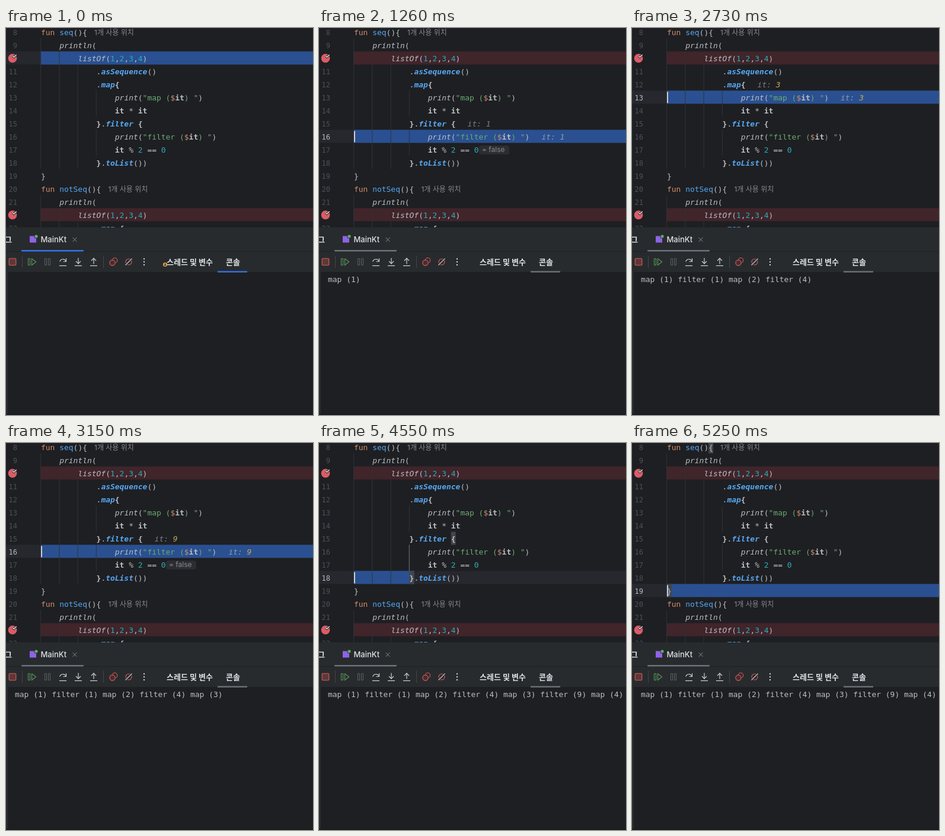
Animation of 518 by 652 pixels, one loop 5.39 s. Source, as an HTML page with a canvas:

```html
<!DOCTYPE html>
<html lang="ko">
<head>
<meta charset="utf-8">
<title>Sequence debugging</title>
<style>
html, body { margin: 0; width: 100%; height: 100%; overflow: hidden; background: #1e1f22; }
canvas { display: block; width: 518px; height: 652px; }
</style>
</head>
<body>
<canvas id="stage"></canvas>
<script>
const W = 518, H = 652, LOOP = 5390;
const LEFT = 59, CHAR = 7.8, ROW = 22;
const MONO = '12.95px "DejaVu Sans Mono", "Noto Sans Mono", monospace';
const SANS = 'Inter, "Noto Sans CJK KR", "Noto Sans CJK", sans-serif';

const canvas = document.getElementById('stage');
const ctx = canvas.getContext('2d');
const ratio = window.devicePixelRatio || 1;
canvas.width = W * ratio;
canvas.height = H * ratio;

// token styles: [colour, font prefix]
const STYLE = {
  k: ['#cf8e6d', ''],
  d: ['#56a8f5', ''],
  p: ['#bcbec4', ''],
  b: ['#bcbec4', 'bold'],
  i: ['#bcbec4', 'italic'],
  f: ['#56a8f5', 'italic bold'],
  n: ['#2aacb8', ''],
  s: ['#6aab73', '']
};

const listOf = [['i', 'listOf'], ['p', '('], ['n', '1'], ['p', ','], ['n', '2'], ['p', ','],
  ['n', '3'], ['p', ','], ['n', '4'], ['p', ')']];
const printCall = name => [['i', 'print'], ['p', '('], ['s', '"' + name + ' ('], ['k', '$'],
  ['b', 'it'], ['s', ') "'], ['p', ')']];
const funHead = name => [['k', 'fun '], ['d', name], ['p', '(){']];
const println = [['i', 'println'], ['p', '(']];

// code from line 8 on: [indent, tokens]
const CODE = [
  [0, funHead('seq')],
  [4, println],
  [8, listOf],
  [12, [['p', '.'], ['f', 'asSequence'], ['p', '()']]],
  [12, [['p', '.'], ['f', 'map'], ['b', '{']]],
  [16, printCall('map')],
  [16, [['b', 'it'], ['p', ' * '], ['b', 'it']]],
  [12, [['b', '}'], ['p', '.'], ['f', 'filter'], ['b', ' {']]],
  [16, printCall('filter')],
  [16, [['b', 'it'], ['p', ' % '], ['n', '2'], ['p', ' == '], ['n', '0']]],
  [12, [['b', '}'], ['p', '.'], ['f', 'toList'], ['p', '())']]],
  [0, [['p', '}']]],
  [0, funHead('notSeq')],
  [4, println],
  [8, listOf],
  [12, [['p', '.'], ['f', 'map'], ['b', ' {']]]
];

// debugger stops: [time, line, delay of the value beside the line]
const STOPS = [
  [0, 10], [560, 13], [910, 14], [1120, 16, 70], [1470, 17],
  [1680, 13], [1960, 14], [2170, 16, 70], [2450, 17],
  [2660, 13], [2940, 14], [3150, 16], [3360, 17],
  [3640, 13], [3850, 14], [4060, 16], [4270, 17],
  [4550, 18], [4760, 9], [5180, 19]
];
const FOCUS_TIME = 70;
const OUTPUT = [1, 2, 3, 4].flatMap(v => [`map (${v}) `, `filter (${v * v}) `]);

const midY = line => 7 + ROW * (line - 8);
const topY = line => midY(line) - 11.5;
const colX = col => LEFT + col * CHAR;
const endX = line => {
  const [indent, tokens] = CODE[line - 8];
  return colX(indent + tokens.reduce((n, t) => n + t[1].length, 0));
};

function rect(x, y, w, h, color) {
  ctx.fillStyle = color;
  ctx.fillRect(x, y, w, h);
}

function text(str, x, y, color, font, align = 'left') {
  ctx.font = font;
  ctx.fillStyle = color;
  ctx.textAlign = align;
  ctx.fillText(str, x, y);
}

function stroke(color, width, build) {
  ctx.strokeStyle = color;
  ctx.lineWidth = width;
  ctx.beginPath();
  build(ctx);
  ctx.stroke();
}

function path(color, width, ...pts) {
  stroke(color, width, c => {
    for (let i = 0; i < pts.length; i += 2) c.lineTo(pts[i], pts[i + 1]);
  });
}

function disc(x, y, r, color) {
  ctx.fillStyle = color;
  ctx.beginPath();
  ctx.arc(x, y, r, 0, 7);
  ctx.fill();
}

function ring(x, y, r, color, fill) {
  if (fill) disc(x, y, r, fill);
  stroke(color, 1.1, c => c.arc(x, y, r, 0, 7));
}

function box(x, y, w, h, r, fill, line) {
  ctx.beginPath();
  ctx.roundRect(x, y, w, h, r);
  if (fill) { ctx.fillStyle = fill; ctx.fill(); }
  if (line) { ctx.strokeStyle = line; ctx.lineWidth = 1.1; ctx.stroke(); }
}

function guide(col, from, to, color = '#313438') {
  rect(colX(col) - 0.8, topY(from), 1, topY(to + 1) - topY(from), color);
}

function bracket(line, col) {
  rect(colX(col), topY(line), CHAR, ROW, '#43454a');
}

function breakpoint(line) {
  const y = midY(line);
  disc(11, y, 7.4, '#db5c66');
  path('#1e1f22', 3.2, 11, y - 4, 13.3, y - 1.8, 18, y - 6.3);
  path('#e8e8ea', 1.5, 11, y - 4, 13.3, y - 1.8, 17.6, y - 6);
}

function valueHint(line, value, changed, x, onRow) {
  const y = midY(line) + 5, font = 'italic ' + MONO;
  const dim = onRow ? '#8c9bb8' : '#7a7e85';
  text('it: ', x, y, dim, font);
  text(value, x + 4 * CHAR, y, changed ? '#c4ab58' : dim, font);
}

function codeLine(line) {
  const [indent, tokens] = CODE[line - 8];
  let col = indent;
  for (const [kind, str] of tokens) {
    const [color, face] = STYLE[kind];
    text(str, colX(col), midY(line) + 5, color, `${face} ${MONO}`);
    col += str.length;
  }
}

function stateAt(t) {
  let k = 0;
  while (k + 1 < STOPS.length && t >= STOPS[k + 1][0]) k++;
  const [start, line, delay = 0] = STOPS[k];
  const item = Math.ceil(k / 4);
  const inMap = line === 13 || line === 14;
  const inFilter = line === 16 || line === 17;
  let printed = k ? 8 : 0;
  if (inMap) printed = 2 * item - 2;
  if (inFilter) printed = 2 * item - 1;
  return { line, item, inMap, inFilter, printed, focus: t >= FOCUS_TIME, beside: t >= start + delay };
}

function drawEditor(s) {
  rect(0, 0, W, 336, '#1e1f22');
  for (const line of [10, 22]) rect(58.5, topY(line), W, ROW, '#40252b');
  rect(0, topY(s.line), W, ROW, '#26282e');
  rect(58.5, topY(s.line), s.line === 18 ? colX(13) - 58.5 : W, ROW, '#2a5091');

  guide(0, 9, 18);
  guide(4, 10, 18);
  guide(8, 11, 18);
  guide(12, 13, 14);
  guide(12, 16, 17);
  guide(0, 21, 23);
  guide(4, 22, 23);
  guide(8, 23, 23);

  if (s.line === 18) {
    bracket(15, 21);
    bracket(18, 12);
    guide(12, 16, 17, '#6f737a');
  }
  if (s.line === 19) {
    bracket(8, 9);
    bracket(19, 0);
  }

  for (let line = 8; line <= 23; line++) {
    codeLine(line);
    if (line === 10 || line === 22) breakpoint(line);
    else text(line, 19, midY(line) + 5, line === s.line ? '#b4b8bf' : '#4b5059',
      '12px "DejaVu Sans Mono", monospace', 'right');
  }
  for (const line of [8, 20])
    text('1개 사용 위치', endX(line) + 12, midY(line) + 4.5, '#868a91', '400 12px ' + SANS);

  let gap = 20;
  const value = s.inFilter ? s.item * s.item : s.item;
  if (s.inFilter) {
    const even = value % 2 === 0;
    const w = even ? 46 : 51;
    box(270, 198, w, 15, 4, '#2b2d30');
    text(even ? '= true' : '= false', 275, 209, '#868a91', '400 12px ' + SANS);
    if (s.line === 17) gap += w;
  }
  if (s.inMap || s.inFilter) {
    const head = s.inMap ? 12 : 15, changed = s.item > 1;
    valueHint(head, value, changed, endX(head) + 20, false);
    if (s.beside) valueHint(s.line, value, changed, endX(s.line) + gap, true);
  }
  if (s.focus) rect(59, topY(s.line) + 2, 2, 19, '#ced0d6');
}

function stepIcon(x, dir) {
  const c = '#ced0d6';
  path(c, 1.2, x - 6, 400.5, x + 6, 400.5);
  if (dir === 0) {
    stroke(c, 1.2, p => p.arc(x, 395, 5.5, Math.PI * 1.08, Math.PI * 1.85));
    path(c, 1.2, x + 5.5, 388, x + 5.5, 393.5, x + 0.5, 393.5);
    return;
  }
  const tip = dir > 0 ? 397 : 388;
  path(c, 1.2, x, 387.5, x, 397.5);
  path(c, 1.2, x - 4, tip - 4 * dir, x, tip, x + 4, tip - 4 * dir);
}

function drawPanel(s) {
  const line = s.focus ? '#6f737a' : '#3574f0';
  const bar = '#282b2d', red = '#db5c5c', green = '#57965c';
  rect(0, 336, W, 75, bar);
  rect(0, 376, W, 1, '#1e1f22');
  text('그', 10, 361, '#dfe1e5', '700 13px ' + SANS, 'right');
  rect(40, 350.5, 11, 11, '#8f62e8');
  disc(51, 351, 3.6, bar);
  disc(51, 351, 2.6, '#5fad65');
  text('MainKt', 58.5, 361, '#dfe1e5', '500 13px ' + SANS);
  path('#868a91', 1, 112.5, 353, 119.5, 360);
  path('#868a91', 1, 119.5, 353, 112.5, 360);
  box(26, 374, 105, 2.6, 1.3, line);

  box(5.2, 388.2, 11.6, 11.6, 1.5, '#5e3838', red);
  for (const x of [27, 164]) rect(x, 384, 1, 20, '#43454a');
  box(37.5, 388.5, 3, 11, 0.5, null, green);
  path(green, 1.2, 43.5, 388.5, 50.5, 394, 43.5, 399.5, 43.5, 388);
  for (const x of [65.5, 71.5]) box(x, 388.5, 3, 11, 0.5, null, '#5a5d63');
  stepIcon(96, 0);
  stepIcon(122, 1);
  stepIcon(148, -1);
  ring(183.5, 391.5, 4.2, red);
  ring(179.5, 395.5, 4.6, red, '#4a2c2e');
  ring(207, 394, 5, red);
  path(bar, 3.5, 201.5, 399.5, 212.5, 388.5);
  path('#ced0d6', 1.1, 201.5, 399.5, 212.5, 388.5);
  for (const y of [389, 394, 399]) disc(233, y, 1.2, '#ced0d6');

  text('스레드 및 변수', 271, 399, '#dfe1e5', '700 13px ' + SANS);
  text('콘솔', 371, 399, '#dfe1e5', '700 13px ' + SANS);
  if (!s.focus) {
    disc(268.5, 398.5, 3.6, '#d9a343');
    path('#1e1f22', 1, 268.5, 396, 268.5, 400.5);
    path('#1e1f22', 1, 266.8, 398.8, 268.5, 400.5, 270.2, 398.8);
  }

  rect(0, 411, W, H - 411, '#1e1f22');
  rect(0, 411, 3, H - 411, '#282b2d');
  rect(0, 650, W, 2, '#191a1c');
  rect(357, 409.5, 50, 2.3, line);
  text(OUTPUT.slice(0, s.printed).join(''), 15, 428, '#bcbec4', MONO);
}

function frame(now) {
  const s = stateAt(now % LOOP);
  ctx.setTransform(ratio, 0, 0, ratio, 0, 0);
  drawEditor(s);
  drawPanel(s);
  requestAnimationFrame(frame);
}
requestAnimationFrame(frame);
</script>
</body>
</html>
```
